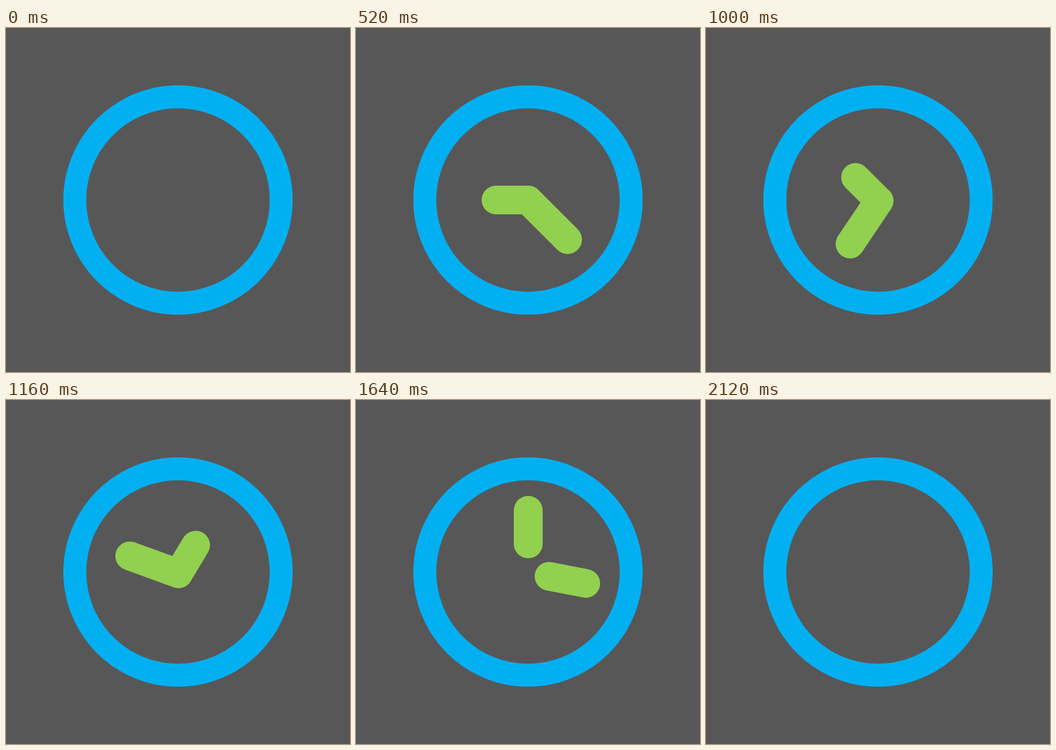
Animation of 720x720 px, one loop 2.2 s. Source, as an HTML page:

```html
<!DOCTYPE html>
<html lang="en">
<head>
<meta charset="utf-8">
<title>Clock</title>
<style>
  html, body { margin: 0; width: 100%; height: 100%; overflow: hidden; background: #575757; }
  svg { display: block; width: 100%; height: 100%; }
  line { stroke: #92d050; stroke-linecap: round; }
</style>
</head>
<body>
<svg viewBox="0 0 720 720">
  <clipPath id="face"><circle cx="360" cy="360" r="193"/></clipPath>
  <g clip-path="url(#face)">
    <line id="long"/>
    <line id="short"/>
  </g>
  <circle cx="360" cy="360" r="216" fill="none" stroke="#02b0f2" stroke-width="48"/>
</svg>
<script>
const LOOP = 2200, STEP = 80, FIRST = 40, EXIT = 1400;
const longHand = document.getElementById('long');
const shortHand = document.getElementById('short');

// Value at time t through [time, value] keys, with a cosine ease between them.
function tween(t, ...keys) {
  if (t <= keys[0][0]) return keys[0][1];
  for (let i = 1; i < keys.length; i++) {
    const [t0, a] = keys[i - 1], [t1, b] = keys[i];
    if (t <= t1) return a + (b - a) * (1 - Math.cos(Math.PI * (t - t0) / (t1 - t0))) / 2;
  }
  return keys[keys.length - 1][1];
}

// Distance a hand has slid outwards; `d` is reached 240 ms into the exit.
const slide = (t, d, power) => d * Math.pow(Math.max(0, t - EXIT) / 240, power);

function place(hand, x, y, degrees, from, length, width) {
  const a = degrees * Math.PI / 180, sin = Math.sin(a), cos = Math.cos(a), to = from + length;
  const attrs = {
    x1: x + from * sin, y1: y - from * cos,
    x2: x + to * sin, y2: y - to * cos,
    'stroke-width': width
  };
  for (const name in attrs) hand.setAttribute(name, attrs[name]);
  hand.style.display = width > 0 ? '' : 'none';
}

function draw(t) {
  const x = tween(t, [520, 360], [840, 363.5], [1160, 361], [EXIT, 360.5]);
  const y = tween(t, [840, 360], [1160, 363.5], [EXIT, 360.5]);
  const turn = tween(t, [840, 0], [EXIT, 180]);

  place(longHand, x, y,
    tween(t, [200, 90], [840, 180]) + turn,
    slide(t, 59.5, 1.24),
    tween(t, [0, 0], [280, 117], [520, 117], [840, 109], [1160, 108.4], [EXIT, 135], [1640, 70]),
    tween(t, [0, 0], [120, 60.5]));

  place(shortHand, x, y,
    tween(t, [520, 270], [840, 281]) + turn,
    slide(t, 44.3, 1.51),
    tween(t, [160, 0], [480, 67], [520, 67], [840, 69.5], [EXIT, 69.8], [1640, 78.4]),
    tween(t, [160, 0], [280, 60]));
}

const start = performance.now();
function tick() {
  const t = (performance.now() - start) % LOOP;
  draw(t < FIRST ? 0 : FIRST + Math.floor((t - FIRST) / STEP) * STEP);
  requestAnimationFrame(tick);
}
tick();
</script>
</body>
</html>
```
